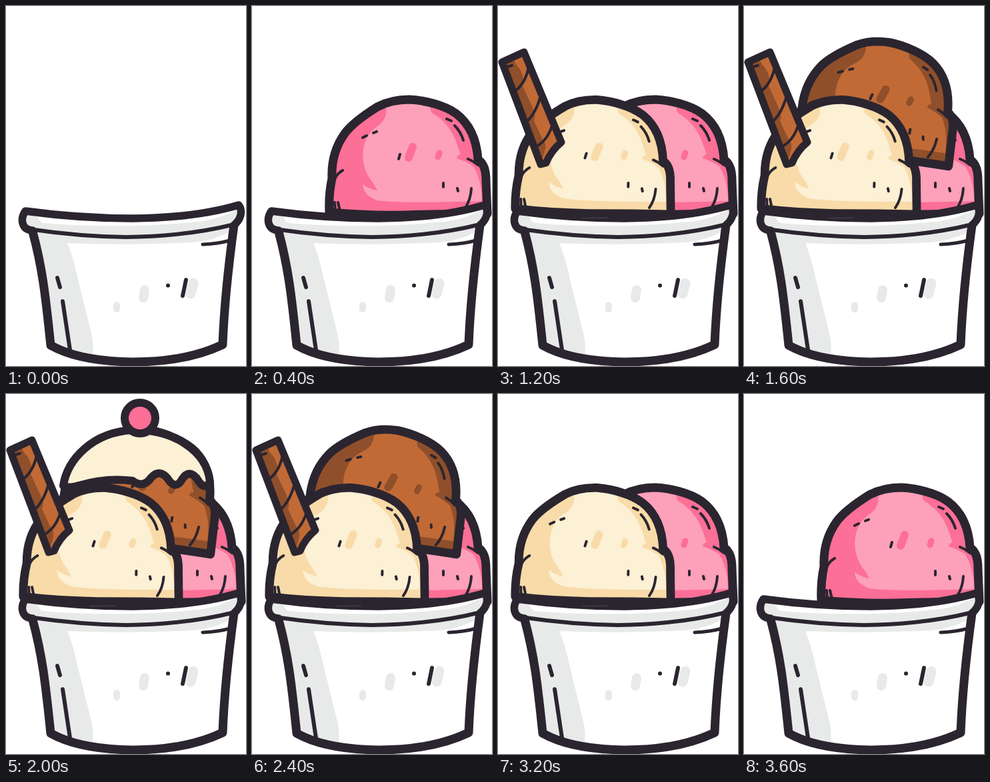
An HTML page that plays this animation: 360x539 px, repeating every 4000 ms.

```html
<!DOCTYPE html>
<html lang="en">
<head>
<meta charset="utf-8">
<title>Ice cream cup</title>
<style>
  html, body { margin: 0; width: 100%; height: 100%; overflow: hidden; background: #fff; }
  svg { display: block; width: 100vw; height: 100vh; }
  .ink { fill: none; stroke: #2b2530; stroke-linecap: round; stroke-linejoin: round; }
  .bold { stroke-width: 13; }
  .thin { stroke-width: 4; }
  .mid { stroke-width: 6; }
  .spot { fill: none; stroke-linecap: round; }
  .pink { --light: #fda0b9; --dark: #fc6f97; }
  .choc { --light: #c16a36; --dark: #8f4f2a; }
  .vanilla { --light: #fcf0d5; --dark: #f8dba8; }
  .shade { fill: var(--dark); }
  .lit { fill: var(--light); }
  .mark { stroke: var(--dark); }
  .grey { fill: #e8eae9; }
  .greyMark { stroke: #e8eae9; }
</style>
</head>
<body>
<svg viewBox="0 0 360 539" xmlns="http://www.w3.org/2000/svg">
  <defs>
    <path id="ball" d="M116 309C115 288 117 272 120 258C119 236 124 212 139 191C150 176 172 161 188 151C203 143 220 140 236 140C258 141 288 148 306 161C326 176 337 200 339 230C348 236 351 246 351 262L353 311Q300 311 230 313Q170 314 116 309Z"/>
    <g id="scoop">
      <use href="#ball" class="shade"/>
      <path class="lit" d="M200 146Q206 168 188 180C163 196 161 232 175 256Q184 268 188 276Q175 274 166 267Q167 284 188 291Q220 296 345 292Q345 262 332 240Q322 233 307 228Q308 223 313 222C305 200 300 178 270 160Q266 155 268 146Z"/>
      <path class="spot mark" stroke-width="12" d="M241 211L235 227"/>
      <path class="spot mark" stroke-width="9" d="M281 220L279 226"/>
      <use href="#ball" class="ink bold"/>
      <path class="ink thin" d="M166 197l6-3M182 190l5-2M292 169l7 3M304 179Q313 188 317 201M222 222l-2 7M287 265v6M308 273l1 4M329 273Q328 290 320 302M324 229Q332 232 339 238M136 246Q126 252 123 262M124 294l1 13M129 294l3 13"/>
    </g>
    <path id="cream" d="M86 137C92 98 130 57 190 54C250 52 302 85 306 132Q297 146 286 126Q274 112 264 128Q254 145 242 126Q230 112 218 125Q206 142 190 130Q150 125 110 137Q96 142 86 137Z"/>
    <path id="wafer" d="M6 84L39 69L95 204Q80 216 72 235L64 237Z"/>
  </defs>

  <use href="#scoop" class="pink" data-level="1"/>
  <use href="#scoop" class="choc" data-level="4" transform="translate(207 148) rotate(9) scale(.99) translate(-239 -235)"/>

  <g data-level="5">
    <use href="#cream" fill="#fcf0d5"/>
    <use href="#cream" class="ink" stroke-width="12"/>
    <circle cx="201" cy="36" r="23" fill="#fc6f97"/>
    <circle cx="201" cy="36" r="23" class="ink" stroke-width="12"/>
  </g>

  <use href="#scoop" class="vanilla" data-level="2" transform="translate(149 234) rotate(1.6) scale(.985) translate(-239 -235)"/>

  <g class="choc" data-level="3">
    <use href="#wafer" class="lit"/>
    <path class="shade" d="M6 84L22 77Q26 88 32 93Q41 108 37 120L51 150Q58 164 54 172L66 198Q74 206 70 218L64 237Z"/>
    <use href="#wafer" class="ink" stroke-width="11"/>
    <path class="ink thin" d="M46 92Q41 116 25 128M65 130Q58 160 42 174M83 173Q76 200 58 210M14 91l7-2"/>
  </g>

  <g>
    <path fill="#fff" d="M41 338C55 390 60 430 68 508Q110 532 190 533Q270 533 324 508Q327 430 342 328Z"/>
    <path class="grey" d="M42 336Q180 354 341 328L336 338Q310 352 280 354Q180 359 92 355Q101 377 107 405L128 490Q132 506 130 525Q95 520 68 508C60 430 55 390 42 336Z"/>
    <path class="spot greyMark" stroke-width="10" d="M166 448v6"/>
    <path class="spot greyMark" stroke-width="14" d="M208 425L206 437"/>
    <path class="spot greyMark" stroke-width="15" d="M281 415L277 431"/>
    <path class="ink bold" d="M40 338C54 390 59 430 67 508Q110 532 190 533Q270 533 325 507Q328 430 342 328"/>
    <path class="ink mid" d="M77 407l4 14M85 442L96 515M270 410L265 434M243 418.500h.01"/>
    <path class="ink" stroke-width="5" d="M295 357Q318 356 336 351"/>

    <path fill="#fff" d="M29 307Q110 318 190 318Q285 317 349 298C355 306 353 320 342 327Q270 345 180 346Q110 345 42 335C26 335 22 320 29 307Z"/>
    <path class="grey" d="M30 310L48 316Q49 323 56 325Q180 335 295 322Q325 317 349 303Q350 320 342 327Q270 345 180 346Q110 345 42 335C28 334 24 322 30 310Z"/>
    <path class="ink mid" d="M42 335Q110 345 180 346Q270 345 342 327"/>
    <path class="ink" stroke-width="11.500" d="M40 336C23 335 21 319 29 307Q110 318 190 318Q285 317 349 298C356 307 352 320 342 328"/>
  </g>
  <path data-level="2" fill="none" stroke="#4b4650" d="M126 317.500L164 317"/>
</svg>
<script>
  const STEP = 400, STEPS = 10;
  const layers = [...document.querySelectorAll('[data-level]')];

  // Layers pile up one per step, then come off in reverse order.
  function draw(now) {
    const step = Math.floor(now / STEP) % STEPS;
    const level = Math.min(step, STEPS - step);
    for (const layer of layers) {
      layer.style.display = layer.dataset.level <= level ? '' : 'none';
    }
  }

  let start;
  function tick(now) {
    start ??= now;
    draw(now - start);
    requestAnimationFrame(tick);
  }
  draw(0);
  requestAnimationFrame(tick);
</script>
</body>
</html>
```
